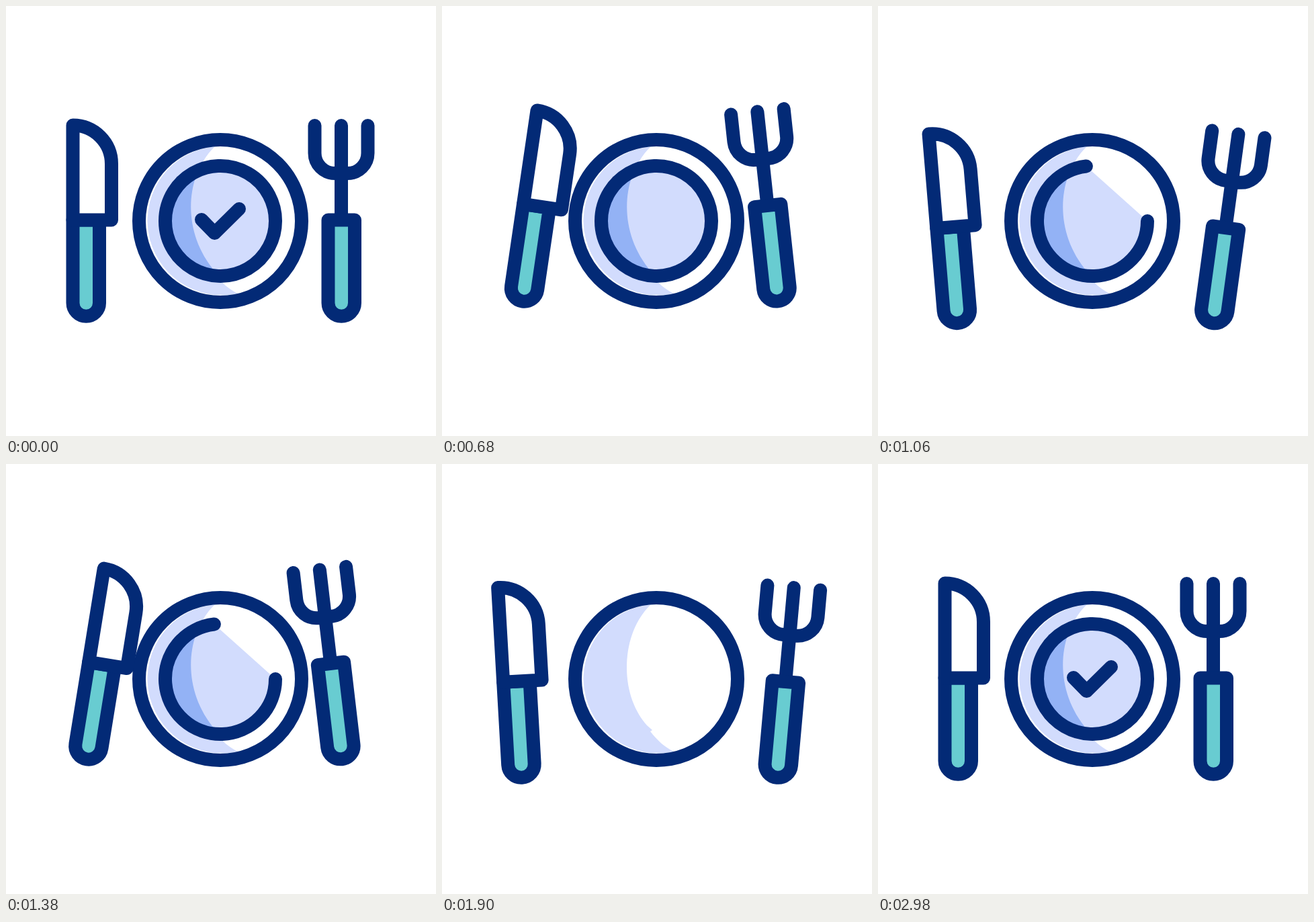
Recreate the animation shown at these times as an HTML page. Size 640 px wide and 640 px high, loop 3.08 s.

```html
<!DOCTYPE html>
<html lang="en">
<head>
<meta charset="utf-8">
<title>Dinner plate</title>
<style>
  html, body { margin: 0; width: 100%; height: 100%; overflow: hidden; background: #fff; }
  svg { display: block; width: 100%; height: 100%; }
  .line { fill: none; stroke: #032a76; stroke-width: 20; stroke-linecap: round; stroke-linejoin: round; }
  .white { fill: #fff; }
  .light { fill: #d2dcfd; }
  .shade { fill: #93b2f5; }
  .teal { fill: #68ccd1; }
</style>
</head>
<body>
<svg viewBox="0 0 640 640">
  <clipPath id="wipe"><rect id="wipeRect" x="220" y="220" width="200" height="200"/></clipPath>

  <path id="rays" class="line"/>

  <path class="light" d="M311 209C286 233 275 268 275 303C275 340 288 370 305 389L313 396L310 398C320 411 332 422 345 428A111 111 0 1 1 311 209Z"/>
  <circle class="line" cx="319" cy="320" r="121"/>

  <g id="food">
    <path id="foodFill" class="light"/>
    <path class="shade" clip-path="url(#wipe)" d="M284 250C268 292 272 350 312 396A78 78 0 0 1 284 250Z"/>
    <path id="foodRim" class="line"/>
  </g>
  <path id="check" class="line" pathLength="1" d="M291 318L310.5 338L347 302"/>

  <g id="knife">
    <path class="line teal" d="M99.5 318.5H139V442A19.75 19.75 0 0 1 99.5 442Z"/>
    <path class="line white" d="M99.5 177.5A57.5 57.5 0 0 1 157 235V318.5H99.5Z"/>
  </g>
  <g id="fork">
    <path class="line" d="M459.5 178V219A30 30 0 0 0 489.5 249H508.5A30 30 0 0 0 538.5 219V178M499 178V318"/>
    <path class="line teal" d="M479.5 318.5H519V442A19.75 19.75 0 0 1 479.5 442Z"/>
  </g>
</svg>
<style>
  .line.teal { fill: #68ccd1; }
  .line.white { fill: #fff; }
</style>
<script>
const LOOP = 3080;
const $ = id => document.getElementById(id);

// Easing with control points (a, 0) and (b, 1)
const bezier = (a, b) => x => {
  let lo = 0, hi = 1, u = x;
  for (let i = 0; i < 24; i++) {
    u = (lo + hi) / 2;
    const v = 1 - u;
    if (3 * u * v * v * a + 3 * u * u * v * b + u * u * u < x) lo = u; else hi = u;
  }
  return u * u * (3 - 2 * u);
};
const smooth = bezier(.4, .6);
const swingIn = bezier(.5, .7), swingOut = bezier(.65, .7), swingBack = bezier(.4, .5);
const chop = bezier(.55, .55), lift = bezier(.25, .6);

// Keys are [time, value, easing towards this key]
const track = keys => t => {
  if (t <= keys[0][0]) return keys[0][1];
  for (let i = 1; i < keys.length; i++) {
    const [t0, v0] = keys[i - 1], [t1, v1, ease = smooth] = keys[i];
    if (t < t1) return v0 + (v1 - v0) * ease((t - t0) / (t1 - t0));
  }
  return keys[keys.length - 1][1];
};

const swing = (near, far) => track([
  [420, 0], [740, near, swingIn], [1090, far, swingOut],
  [1420, near, swingBack], [1770, far, swingOut], [2080, 0]
]);
const knifeTurn = swing(9.5, -5.2);
const forkTurn = swing(-7, 8.2);
const rise = track([
  [420, 0], [700, -22.5], [1010, 13, chop],
  [1390, -22.5, lift], [1690, 13, chop], [2060, 0]
]);
const bite = track([[820, 0], [1050, 96.3], [1500, 96.3], [1800, 360]]);
const wipe = track([[1500, 0], [1610, 200]]);
const pop = track([[2400, 0], [2700, 1.1], [2960, 1]]);
const checkOut = track([[420, 1], [620, 0]]);
const checkIn = track([[2120, 0], [2360, 1]]);
const rayHead = track([[2460, 150], [2680, 212]]);
const rayTail = track([[2580, 150], [2960, 212]]);

const polar = (cx, cy, r, deg) => {
  const a = deg * Math.PI / 180;
  return (cx + r * Math.cos(a)).toFixed(2) + ' ' + (cy + r * Math.sin(a)).toFixed(2);
};
const show = (el, on) => el.setAttribute('visibility', on ? 'visible' : 'hidden');

function drawFood(t) {
  const back = t >= 2400;
  const sweep = 359.9 - (back ? 0 : Math.min(bite(t), 359.9));
  const scale = back ? pop(t) : 1;
  const d = `M401 320A82 82 0 ${sweep > 180 ? 1 : 0} 1 ${polar(319, 320, 82, sweep)}`;
  $('foodFill').setAttribute('d', d);
  $('foodRim').setAttribute('d', d);
  $('wipeRect').setAttribute('y', 220 + (back ? 0 : wipe(t)));
  $('food').setAttribute('transform', `translate(319 320) scale(${scale}) translate(-319 -320)`);
  show($('food'), sweep > .5 && scale > .001);
}

function drawCheck(t) {
  const part = t < 1500 ? checkOut(t) : checkIn(t);
  $('check').setAttribute('stroke-dasharray', part < 1 ? `${part} 2` : 'none');
  show($('check'), part > .002);
}

function drawRays(t) {
  const on = t > 2460 && t < 2960;
  show($('rays'), on);
  if (!on) return;
  const d = [-115, -90, -65, 65, 90, 115].map(a =>
    `M${polar(317, 314.5, rayTail(t), a)}L${polar(317, 314.5, rayHead(t), a)}`);
  $('rays').setAttribute('d', d.join(''));
}

function draw(t) {
  const y = rise(t);
  $('knife').setAttribute('transform', `translate(0 ${y}) rotate(${knifeTurn(t)} 119 465)`);
  $('fork').setAttribute('transform', `translate(0 ${y}) rotate(${forkTurn(t)} 499 454)`);
  drawFood(t);
  drawCheck(t);
  drawRays(t);
}

const start = performance.now();
function tick() {
  draw((performance.now() - start) % LOOP);
  requestAnimationFrame(tick);
}
tick();
</script>
</body>
</html>
```
